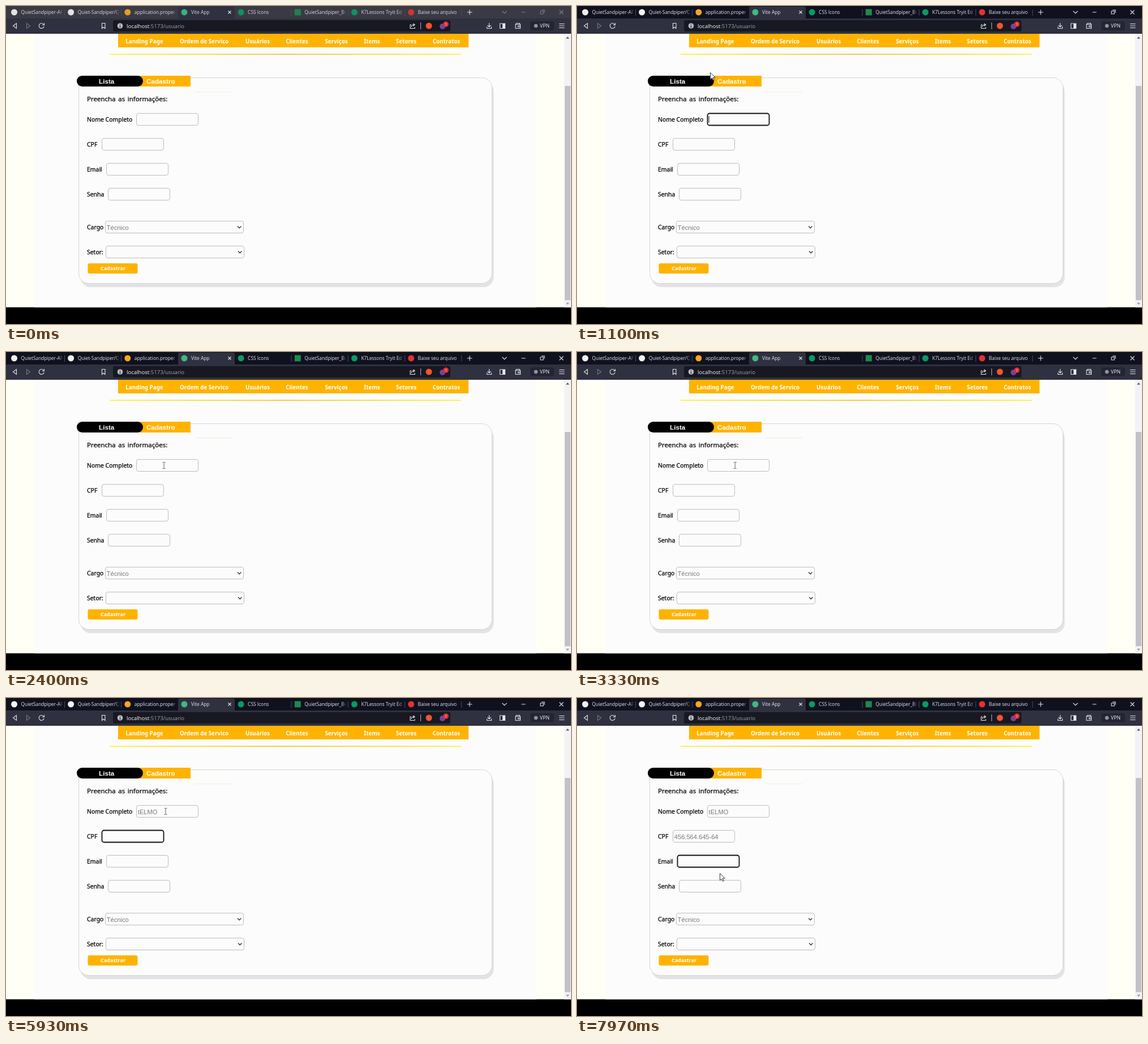
Animation, 998 px wide and 561 px high, one loop 8000 ms. Source, as an HTML page:

```html
<!DOCTYPE html>
<html lang="pt">
<head>
<meta charset="utf-8">
<title>Cadastro</title>
<style>
  html, body { margin: 0; width: 100%; height: 100%; overflow: hidden; background: #000; }
  svg { display: block; width: 998px; height: 561px; }
  .ui { font-family: "Open Sans", sans-serif; font-size: 8.4px; fill: #f0f0f4; }
  .page { font-family: "Noto Sans", sans-serif; }
  .label { font-size: 10.45px; fill: #000; stroke: #000; stroke-width: .25; }
  .heading { font-size: 11.5px; word-spacing: 1.6px; }
  .nav { font-size: 9.8px; font-weight: 700; fill: #fff; text-anchor: middle; }
  .button { font-size: 9px; font-weight: 600; fill: #fff; text-anchor: middle; }
  .tab { font: 700 11.7px "Liberation Sans", Arial, sans-serif; fill: #fff; }
  .value { font: 11.1px "Liberation Sans", Arial, sans-serif; fill: #777; }
  .icon { fill: none; stroke: #e4e4ea; stroke-width: 1.1; }
</style>
</head>
<body>
<svg id="stage" viewBox="0 0 998 561">
  <defs>
    <linearGradient id="fade" gradientUnits="userSpaceOnUse" x1="12" x2="86" y1="0" y2="0">
      <stop offset=".9" stop-color="#e6e6ec"/><stop offset="1" stop-color="#e6e6ec" stop-opacity="0"/>
    </linearGradient>
    <linearGradient id="rule" gradientUnits="userSpaceOnUse" x1="183" x2="804" y1="0" y2="0">
      <stop stop-color="#ffee20"/><stop offset=".5" stop-color="#f5b400"/><stop offset="1" stop-color="#ffee20"/>
    </linearGradient>
  </defs>

  <g id="chrome" class="ui">
    <rect id="strip" width="998" height="24"/>
    <rect y="22" width="998" height="27" fill="#2f3140"/>
    <path d="M304 23V4q0-3 3-3h94q3 0 3 3v19z" fill="#2f3140"/>
    <g id="tabs"></g>
    <path class="icon" d="M392.500 8.500l5 5m0-5l-5 5M814.500 11h9m-4.500-4.500v9"/>
    <g id="controls" class="icon">
      <path d="M876.500 9l4 4 4-4M910.500 11h7M944 9h5v5h-5zm2-2h5v5M977.500 7.500l7 7m0-7l-7 7"/>
    </g>
    <path class="icon" d="M18.500 30.500v9l-6-4.500z"/>
    <path class="icon" d="M36.500 30.500v9l6-4.500z" opacity=".4"/>
    <path class="icon" d="M66.500 32.500a4.500 4.500 0 1 0 .6 3.500M67.500 30v3.500H64"/>
    <path class="icon" d="M169.500 30.500h5.500v9l-2.800-2.200-2.700 2.200z"/>
    <rect x="189" y="25" width="596" height="20" rx="3" fill="#171822"/>
    <circle cx="201.500" cy="35" r="4.800" fill="#b9bac4"/>
    <path d="M201.500 32v1m0 1.300v4" stroke="#171822" stroke-width="1.200"/>
    <text x="213" y="38.500" font-size="9.600" fill="#fff">localhost<tspan fill="#a4a5b0">:5173/usuario</tspan></text>
    <path class="icon" d="M716 33h-2v6.500h8V37m-6 0q0-4 5-4m-2-2l3 2-3 2.500" stroke-width=".9"/>
    <path d="M732.500 29v12" stroke="#b0b0b8"/>
    <circle cx="747" cy="35" r="5.500" fill="#f4552d"/>
    <circle cx="771" cy="36" r="5" fill="#7a3fa0"/>
    <circle cx="777" cy="32" r="4.800" fill="#e23030"/>
    <text x="777" y="34.500" font-size="7" text-anchor="middle">1</text>
    <path class="icon" d="M853.500 30v6.500m-3-2.500l3 3 3-3M849.500 36.500v3h8v-3"/>
    <path class="icon" d="M872.500 31h9v8.500h-9z"/><path d="M877 31h5v8.500h-5z" fill="#e4e4ea"/>
    <path class="icon" d="M900 32.500h8.500v7H900zm0 0l1.500-2h6v2m1 2.500h-4v2h4"/>
    <rect x="926" y="27" width="42" height="16" rx="3" fill="#242532"/>
    <circle cx="936" cy="35" r="3.300" fill="#9495a0"/>
    <text x="943" y="38" font-size="8.700">VPN</text>
    <path class="icon" d="M977 31.500h9.500M977 35h9.500M977 38.500h9.500"/>
  </g>

  <g class="page">
    <rect y="49" width="998" height="482.500" fill="#fffff6"/>
    <rect x="50" y="49" width="887" height="482.500" fill="#fcfcfc"/>
    <rect x="986" y="49" width="12" height="482.500" fill="#f3f3f7"/>
    <rect x="987" y="141" width="10" height="378" fill="#c1c1c9"/>
    <path d="M989 57.500h6l-3-3.500z" fill="#555"/><path d="M989 523.500h6l-3 3.500z" fill="#999"/>
    <rect x="198" y="49" width="619" height="24" fill="#ffb300"/>
    <g id="nav" class="nav"></g>
    <rect x="183" y="84.500" width="621" height="1.400" fill="url(#rule)"/>

    <rect x="131.500" y="133" width="730" height="363" rx="18" fill="#e3e3e7"/>
    <rect x="128.500" y="126.500" width="730" height="363" rx="18" fill="#fcfcfc" stroke="#cbcbc0" stroke-width=".8"/>
    <rect x="225" y="123" width="101" height="19" fill="#ffb300"/>
    <rect x="125" y="123" width="117" height="19" rx="9.500"/>
    <text class="tab" x="164" y="137">Lista</text>
    <text class="tab" x="248" y="137">Cadastro</text>
    <path d="M333 151.500h65" stroke="#eeeeda"/>
    <text class="label heading" x="143" y="168">Preencha as informações:</text>
    <g id="form"></g>
    <rect x="144.500" y="454" width="88" height="18" rx="3" fill="#ffb300"/>
    <text class="button" x="189" y="465.500">Cadastrar</text>
  </g>

  <path id="caret" stroke="#111"/>
  <path id="arrow" d="M.5 .5v12.300l2.900-2.800 2 4.300 1.900-.9-2-4.200h4z" fill="#fff" stroke="#222" stroke-width=".9"/>
  <path id="beam" d="M-2.500-5.500h2l.5.500.500-.5h2M0-5V5M-2.500 5.500h2L0 5l.5.500h2" fill="none" stroke="#666"/>
</svg>

<script>
const LOOP = 8000, ACTIVE_AT = 770;
const $ = id => document.getElementById(id);

function add(parent, tag, attrs, text = "") {
  const el = document.createElementNS("http://www.w3.org/2000/svg", tag);
  for (const key in attrs) el.setAttribute(key, attrs[key]);
  el.textContent = text;
  return parent.appendChild(el);
}

[
  ["QuietSandpiper-AP", "#f2f2f2"], ["Quiet-Sandpiper/Q", "#f2f2f2"], ["application.proper", "#f5a623"],
  ["Vite App", "#41b883"], ["CSS Icons", "#0a9a64"], ["QuietSandpiper_Bu", "#1d8a4e", "square"],
  ["K7Lessons Tryit Ed", "#0a9a64"], ["Baixe seu arquivo", "#e0342f"]
].forEach(([title, color, square], i) => {
  const tab = add($("tabs"), "g", { transform: `translate(${14.5 + 100.15 * i} 0)` });
  if (square) add(tab, "rect", { x: -5.5, y: 5.5, width: 11, height: 11, fill: color });
  else add(tab, "circle", { cy: 11, r: 5.5, fill: color });
  add(tab, "text", { x: 12, y: 14, fill: "url(#fade)" }, title);
  if (i != 2 && i != 3) add(tab, "path", { d: "M89 6v11", stroke: "#4b4d5c" });
});

[["Landing Page", 244.5], ["Ordem de Servico", 350], ["Usuários", 444.5], ["Clientes", 514],
 ["Serviços", 583.5], ["Items", 646.5], ["Setores", 707], ["Contratos", 778]]
  .forEach(([title, x]) => add($("nav"), "text", { x, y: 66 }, title));

function addField(label, x, y, width = 109) {
  const form = $("form");
  add(form, "text", { class: "label", x: 143, y: y + 15 }, label);
  const box = add(form, "rect", { x: x + .5, y: y + .5, width, height: 21, rx: 3.5, fill: "#fcfcfc", stroke: "#bcbcc4" });
  const value = add(form, "text", { class: "value", x: x + 2.8, y: y + 15.5 });
  return { x, y, width, box, value };
}

const [nome, cpf, email, senha] = [["Nome Completo", 230, 189], ["CPF", 169, 233], ["Email", 177, 277], ["Senha", 180, 321]]
  .map(args => addField(...args));
const inputs = [nome, cpf, email, senha];
const selects = [addField("Cargo", 175, 379, 244), addField("Setor:", 176, 423, 244)];
selects[0].value.textContent = "Técnico";
for (const { x, y } of selects)
  add($("form"), "path", { d: `M${x + 234} ${y + 9.5}l3.200 3.200 3.200-3.200`, fill: "none", stroke: "#333", "stroke-width": 1.4 });

// Time from which each field (or none) holds the focus.
const focusSteps = [[0, null], [ACTIVE_AT, nome], [1700, null], [3600, nome], [5400, cpf], [7300, email]];
const mousePath = [[0, 235, 117], [1150, 235, 117], [2250, 279, 200], [3300, 279, 200],
                   [3500, 282, 200], [7520, 282, 200], [7850, 252, 309], [LOOP, 252, 309]];
const typing = [
  { field: nome, keys: "tELMO", start: 4500, step: 140, format: s => s },
  { field: cpf, keys: "45656464564", start: 6050, step: 90,
    format: s => s.replace(/^(\d{3})(?=\d)/, "$1.").replace(/\.(\d{3})(?=\d)/, ".$1.").replace(/(\.\d{3})\.(\d{3})(?=\d)/, "$1.$2-") }
];

function mouseAt(t) {
  const i = Math.max(1, mousePath.findIndex(p => p[0] > t));
  const [t0, x0, y0] = mousePath[i - 1], [t1, x1, y1] = mousePath[i];
  const p = (t - t0) / (t1 - t0), e = p * p * (3 - 2 * p);
  return [x0 + (x1 - x0) * e, y0 + (y1 - y0) * e];
}

function render(t) {
  const active = t >= ACTIVE_AT;
  $("strip").setAttribute("fill", active ? "#0f111f" : "#3b3a44");
  $("tabs").setAttribute("opacity", active ? 1 : .92);
  $("controls").setAttribute("opacity", active ? 1 : .4);

  const [focusedAt, focused] = focusSteps.findLast(step => step[0] <= t);
  let lastInput = focusedAt;
  for (const { field, keys, start, step, format } of typing) {
    const count = Math.max(0, Math.min(keys.length, Math.floor((t - start) / step) + 1));
    field.value.textContent = format(keys.slice(0, count));
    if (field === focused && count) lastInput = start + (count - 1) * step;
  }

  for (const field of inputs) {
    const on = field === focused;
    field.box.setAttribute("stroke", on ? "#111" : "#bcbcc4");
    field.box.setAttribute("stroke-width", on ? 1.8 : 1);
  }

  const caretOn = focused && (t - lastInput) % 1000 < 500;
  $("caret").style.display = caretOn ? "" : "none";
  if (caretOn) {
    const width = focused.value.textContent ? focused.value.getComputedTextLength() : 0;
    $("caret").setAttribute("d", `M${focused.x + 3 + width} ${focused.y + 5}v12`);
  }

  const [x, y] = mouseAt(t);
  const overInput = inputs.some(f => x > f.x && x < f.x + f.width && y > f.y && y < f.y + 22);
  for (const [id, visible] of [["arrow", active && !overInput], ["beam", active && overInput]]) {
    $(id).style.display = visible ? "" : "none";
    $(id).setAttribute("transform", `translate(${x} ${y})`);
  }
}

function frame() {
  render(performance.now() % LOOP);
  requestAnimationFrame(frame);
}
frame();
</script>
</body>
</html>
```
